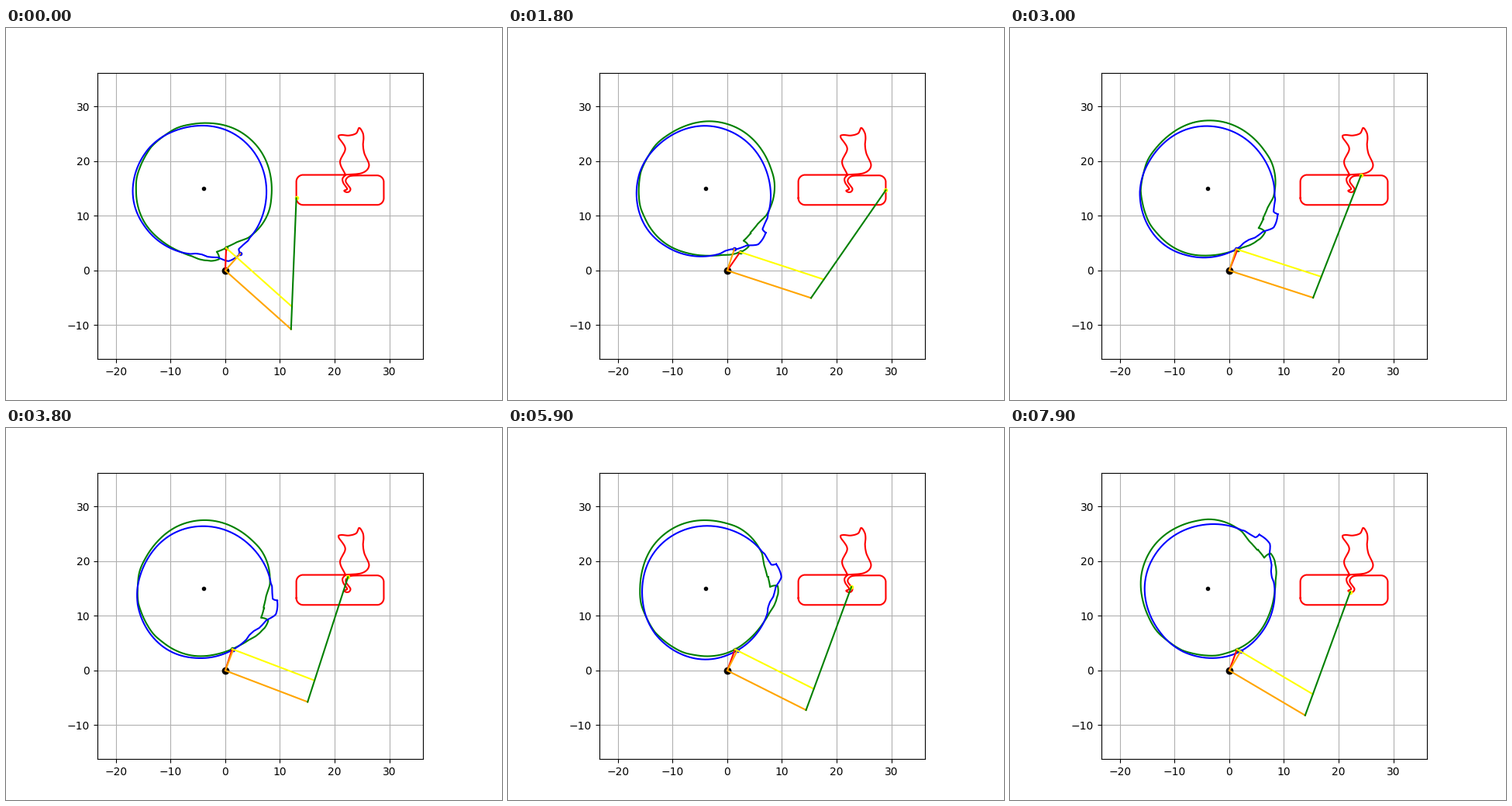
Recreate the animation shown at these times as a matplotlib script. Size 640 by 480 pixels, loop 8000 ms.

```python
import numpy as np
import matplotlib.pyplot as plt
from matplotlib.animation import FuncAnimation

TURN = 267                      # steps in one full cam turn
FRAMES, INTERVAL = 80, 100
STEP = 2 * np.pi / TURN
CAM = np.array([-4.0, 15.0])
CRANK, LINK, ARM = np.sqrt(17), np.sqrt(260), 24

LEFT, RIGHT, BOTTOM, TOP, R = 13, 29, 12, 17.5, 1.25

# Key points, evenly spaced in time
TAIL = [(25, 17.4), (22.95, 17.3), (22.2, 16.85), (22.05, 16.25),
        (22.5, 15.55), (22.9, 14.95), (22.7, 14.45), (22.2, 14.32),
        (21.75, 14.6), (22.3, 14.95), (21.65, 15.9), (21.45, 16.8),
        (22, 17.5)]
BODY = [(22, 17.5), (21, 19.85), (21.95, 22.3), (20.75, 24.35),
        (21.15, 24.8), (22.6, 24.7), (23.95, 25.1), (24.5, 26.1),
        (25.15, 25.2), (25.3, 24.2), (25.2, 23), (25.45, 21.4),
        (26.3, 19.2), (25.05, 17.85), (21.8, 17.5)]


def unit(a):
    return np.stack([np.cos(a), np.sin(a)], axis=-1)


def arc(t0, t1, cx, cy, start):
    """Counter-clockwise quarter turn as rows of time, x, y."""
    a = np.radians(np.linspace(start, start + 90, 13))
    xy = np.array([cx, cy]) + R * unit(a)
    return np.column_stack([np.linspace(t0, t1, 13), xy])


def spline(t0, t1, points, per=10):
    """Catmull-Rom curve through the points as rows of time, x, y."""
    p = np.array(points, float)
    m = np.gradient(p, axis=0)
    n = len(p) - 1
    s = np.linspace(0, n, n * per + 1)
    i = np.minimum(s.astype(int), n - 1)
    u = (s - i)[:, None]
    v = 1 - u
    xy = (v * v * ((1 + 2 * u) * p[i] + u * m[i])
          + u * u * ((1 + 2 * v) * p[i + 1] - v * m[i + 1]))
    return np.column_stack([t0 + (t1 - t0) * s / n, xy])


# Straight edges are the gaps between neighbouring pieces
track = np.vstack([
    arc(0, 8.1, LEFT + R, BOTTOM + R, 180),
    arc(11.75, 17, RIGHT - R, BOTTOM + R, 270),
    arc(19, 23.5, RIGHT - R, TOP - 0.1 - R, 0),
    spline(27, 114, TAIL),
    spline(114, 254.5, BODY)[1:],
    arc(258, 265.5, LEFT + R, TOP - R, 90),
    [(TURN, LEFT, BOTTOM + R)],
])


def linkage(t):
    """Pen position and the two link angles at time t."""
    pen = np.stack([np.interp(t, track[:, 0], track[:, i]) for i in (1, 2)], axis=-1)
    d = np.hypot(pen[..., 0], pen[..., 1])
    aim = np.arctan2(pen[..., 1], pen[..., 0])
    a = aim - np.arccos((LINK**2 + d**2 - ARM**2) / (2 * LINK * d))
    b = aim + np.arccos((ARM**2 + d**2 - LINK**2) / (2 * ARM * d))
    return pen, a, b


steps = np.arange(TURN + 1)
_, alpha, beta = linkage(steps)


def cam_shape(angles):
    """Follower path seen from the turning cam."""
    v = CRANK * unit(angles) - CAM
    return (v[:, 0] + 1j * v[:, 1]) * np.exp(-1j * STEP * steps)


green_cam = cam_shape(beta)
blue_cam = cam_shape(alpha + np.pi / 2)

fig = plt.figure(figsize=(6.4, 4.8), dpi=100)
ax = fig.add_subplot()
ax.set_aspect("equal")
ax.set(xlim=(-23.395, 36.175), ylim=(-16.2, 36.2),
       xticks=range(-20, 31, 10), yticks=range(-10, 31, 10))
ax.grid(True)

ax.plot(0, 0, "ko")
ax.plot(*CAM, "k.")
ax.plot(track[:, 1], track[:, 2], "r")


def line(color, **kw):
    return ax.plot([], [], color=color, **kw)[0]


green_line, blue_line = line("green"), line("blue")
green_dot = line("green", marker="o", ms=3)
blue_dot = line("blue", marker="o", ms=3)
pen_dot = line("yellow", marker=".")
red_crank, crank = line("red"), line("orange")
yellow_link, pen_link = line("yellow"), line("green")
artists = [green_line, blue_line, green_dot, blue_dot, pen_dot,
           red_crank, crank, yellow_link, pen_link]


def put(artist, *points):
    artist.set_data(*np.array(points).T)


def update(t):
    spin = np.exp(1j * STEP * t)
    for artist, shape in ((green_line, green_cam), (blue_line, blue_cam)):
        z = shape * spin
        artist.set_data(CAM[0] + z.real, CAM[1] + z.imag)

    pen, a, b = linkage(t)
    tip = CRANK * unit(b)
    blue_tip = CRANK * unit(a + np.pi / 2)
    elbow = LINK * unit(a)
    put(green_dot, tip)
    put(blue_dot, blue_tip)
    put(pen_dot, pen)
    put(red_crank, (0, 0), tip)
    put(crank, blue_tip, (0, 0), elbow)
    put(yellow_link, tip, tip + elbow)
    put(pen_link, elbow, pen)
    return artists


anim = FuncAnimation(fig, update, frames=FRAMES, interval=INTERVAL,
                     init_func=lambda: update(0), repeat=True, repeat_delay=0)
plt.show()
```
